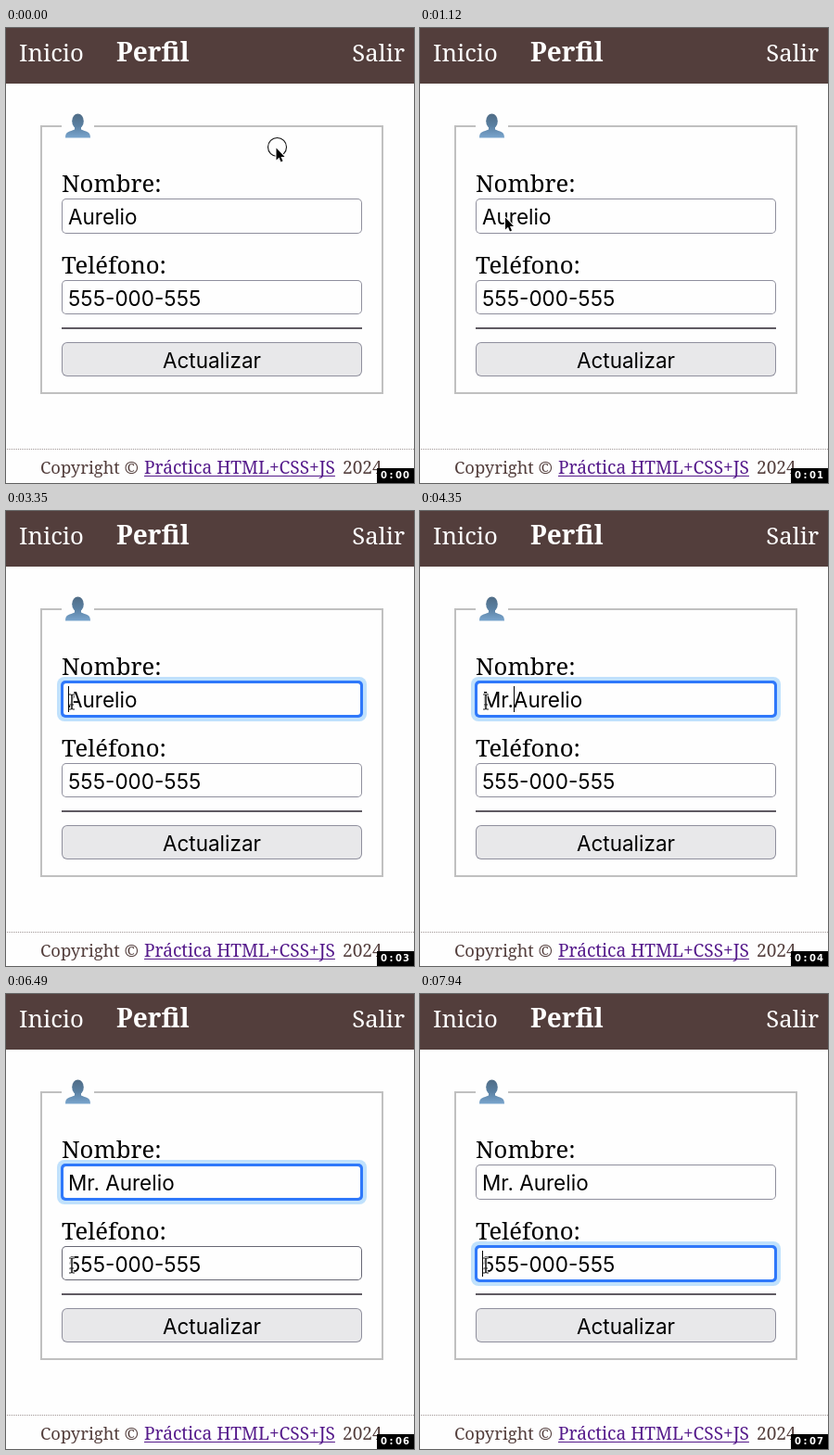
An HTML page with a canvas for the animation above (8000 ms loop, 440 by 491 pixels).

```html
<!DOCTYPE html>
<html lang="es">
<head>
<meta charset="utf-8">
<title>Perfil</title>
<style>
  html, body { margin: 0; width: 100%; height: 100%; overflow: hidden; background: #fefefe; }
  canvas { display: block; }
</style>
</head>
<body>
<canvas id="stage" width="440" height="491"></canvas>
<script>
const ctx = document.getElementById('stage').getContext('2d');
const LOOP = 8000;
const SERIF = '"Noto Serif", Georgia, serif';
const SANS = 'Inter, "Liberation Sans", sans-serif';
const HEAD_FONT = '500 25.7px ' + SERIF;
const FOOT_FONT = '500 19.1px ' + SERIF;
const FIELD_FONT = '22.5px ' + SANS;
const PAPER = '#fefefe', BROWN = '#533e3c', LINK = '#551a8b', EDGE = '#8f8f9d';
const ROW = 88;           // distance between the two inputs
const NAME = 'Aurelio', PHONE = '555-000-555';

// [start, value] lists; the last entry already started wins
const CLOCK = [[0, 0], [1120, 1], [2000, 2], [3050, 3], [4050, 4], [5100, 5], [6070, 6], [7240, 7]];
const TYPED = [[0, ''], [3500, 'M'], [3800, 'Mr'], [4350, 'Mr.'], [4800, 'Mr. ']];
const CARET = [[0, 0], [2150, 1], [2750, 0], [3350, 1], [5200, 0], [5650, 1],
               [6210, 0], [6790, 1], [7340, 0], [7940, 1]];
const FOCUS = [[0, -1], [2150, 0], [6790, 1]];
const CLICKS = [[0, 140], [2150, 2300], [6790, 6940]];

const at = (list, t) => list.reduce((v, [start, value]) => t >= start ? value : v, list[0][1]);
const mix = (a, b, k) => a + (b - a) * k;
const ease = k => k * k * (3 - 2 * k);

// progress in held steps: the first step lands at `start`, the last at `end`
function steps(t, start, end, n) {
  const gap = (end - start) / (n - 1);
  return Math.max(0, Math.min(n, Math.floor((t - start) / gap + 1 + 1e-6))) / n;
}

function pointer(t) {
  if (t < 1270) {
    const k = ease(steps(t, 140, 1120, 8));
    return { x: mix(291.5, 92, k), y: mix(129.5, 204.5, k), beam: false };
  }
  if (t < 5650) {
    const k = steps(t, 1270, 1560, 3);
    return { x: mix(92, 71, k * (2 - k)), y: mix(204.5, 206, k), beam: true };
  }
  const k = ease(steps(t, 5650, 6490, 7));
  const x = 71 - 66 * Math.sin(Math.PI * k), y = mix(206, 293, k);
  return { x, y, beam: inField(x, y, 0) || inField(x, y, 1) };
}

function inField(x, y, i) {
  return x >= 60 && x < 384 && y >= 184 + ROW * i && y < 222 + ROW * i;
}

function text(s, x, y, font, color, align = 'left') {
  ctx.font = font;
  ctx.fillStyle = color;
  ctx.textAlign = align;
  ctx.fillText(s, x, y);
}

function rect(x, y, w, h, color) {
  ctx.fillStyle = color;
  ctx.fillRect(x, y, w, h);
}

function box(x, y, w, h, r, color) {
  ctx.fillStyle = color;
  ctx.beginPath();
  ctx.roundRect(x, y, w, h, r);
  ctx.fill();
}

function header() {
  rect(0, 0, 440, 60, BROWN);
  text('Inicio', 14, 36, HEAD_FONT, '#fff');
  text('Perfil', 119, 36, 'bold 28px ' + SERIF, '#fff');
  text('Salir', 430, 36, HEAD_FONT, '#fff', 'right');
}

function fieldset() {
  ctx.strokeStyle = '#c0c0c0';
  ctx.lineWidth = 2;
  ctx.strokeRect(38, 106, 368, 288);
  rect(60, 103, 35, 6, PAPER);
  bust();
}

function bust() {
  const g = ctx.createLinearGradient(0, 92, 0, 119);
  g.addColorStop(0, '#4f6b84');
  g.addColorStop(0.5, '#5a80a2');
  g.addColorStop(1, '#7aa6cf');
  ctx.fillStyle = g;
  ctx.beginPath();
  ctx.ellipse(77.5, 100.5, 6.3, 8, 0, 0, 7);
  ctx.fill();
  ctx.beginPath();
  ctx.moveTo(64, 118.5);
  ctx.bezierCurveTo(64, 111, 69, 112, 74, 109.5);
  ctx.lineTo(74, 105);
  ctx.lineTo(81, 105);
  ctx.lineTo(81, 109.5);
  ctx.bezierCurveTo(86, 112, 91, 111, 91, 118.5);
  ctx.fill();
}

function field(i, label, value, focused, hover) {
  const y = 184 + ROW * i;
  text(label, 60, y - 7, HEAD_FONT, '#000');
  if (focused) {
    box(55, y - 5, 334, 48, 8, '#c0e1fc');
    box(59, y - 1, 326, 40, 5, '#2f78fa');
    box(62, y + 2, 320, 34, 3, PAPER);
  } else {
    box(60, y, 324, 38 - i, 5, hover ? '#676774' : EDGE);
    box(61, y + 1, 322, 36 - i, 4, PAPER);
  }
  text(value, 67, y + 28, FIELD_FONT, '#000');
}

function caret(i, prefix) {
  ctx.font = FIELD_FONT;
  rect(67 + Math.round(ctx.measureText(prefix).width), 189 + ROW * i, 1, 28, '#000');
}

function button() {
  rect(60, 323, 324, 2, '#5f5a62');
  box(60, 339, 324, 37, 6, EDGE);
  box(61, 340, 322, 35, 5, '#e8e8ea');
  text('Actualizar', 222, 367, FIELD_FONT, '#000', 'center');
}

function footer() {
  for (let x = 1; x < 440; x += 2) rect(x, 454, 1, 1, '#a09695');
  text('Copyright ©', 37, 481, '500 18.4px ' + SERIF, BROWN);
  const link = 'Práctica HTML+CSS+JS';
  text(link, 149, 481, FOOT_FONT, LINK);
  rect(149, 483, ctx.measureText(link).width, 1, LINK);
  text('2024', 363, 481, FOOT_FONT, BROWN);
}

function clock(sec) {
  rect(400, 475, 40, 16, '#000');
  const font = 'bold 10px "DejaVu Sans", sans-serif';
  [...('0:0' + sec)].forEach((c, i) => text(c, 407.5 + 8 * i, 486, font, '#fff', 'center'));
}

function path(points) {
  ctx.beginPath();
  points.forEach(([x, y]) => ctx.lineTo(x, y));
}

function arrow() {
  path([[0, 0], [0, 13], [3, 10.3], [5, 15], [7, 14.1], [5, 9.5], [9, 9.5]]);
  ctx.closePath();
  ctx.lineJoin = 'round';
  ctx.lineWidth = 2;
  ctx.strokeStyle = '#fff';
  ctx.stroke();
  ctx.fillStyle = '#000';
  ctx.fill();
}

function beam() {
  for (const [width, color] of [[3, '#fff'], [1.1, '#222']]) {
    ctx.lineWidth = width;
    ctx.strokeStyle = color;
    path([[-3, -8], [-1, -8], [0, -7], [0, 7], [-1, 8], [-3, 8]]);
    ctx.stroke();
    path([[3, -8], [1, -8], [0, -7], [0, 7], [1, 8], [3, 8]]);
    ctx.stroke();
    path([[-2, 3], [2, 3]]);
    ctx.stroke();
  }
}

function drawPointer(p, clicking) {
  ctx.save();
  ctx.translate(p.x, p.y);
  if (clicking) {
    ctx.strokeStyle = '#111';
    ctx.lineWidth = 1.1;
    ctx.beginPath();
    ctx.arc(1, -1, 10, 0, 7);
    ctx.stroke();
  }
  p.beam ? beam() : arrow();
  ctx.restore();
}

function draw(t) {
  const p = pointer(t), focus = at(FOCUS, t), typed = at(TYPED, t);
  const hover = i => p.beam && inField(p.x, p.y, i);
  rect(0, 0, 440, 491, PAPER);
  header();
  fieldset();
  field(0, 'Nombre:', typed + NAME, focus === 0, hover(0));
  field(1, 'Teléfono:', PHONE, focus === 1, hover(1));
  button();
  footer();
  if (at(CARET, t)) caret(focus, focus === 0 ? typed : '');
  drawPointer(p, CLICKS.some(([a, b]) => t >= a && t < b));
  clock(at(CLOCK, t));
}

const begin = performance.now();
function tick() {
  draw((performance.now() - begin) % LOOP);
  requestAnimationFrame(tick);
}
tick();
</script>
</body>
</html>
```
